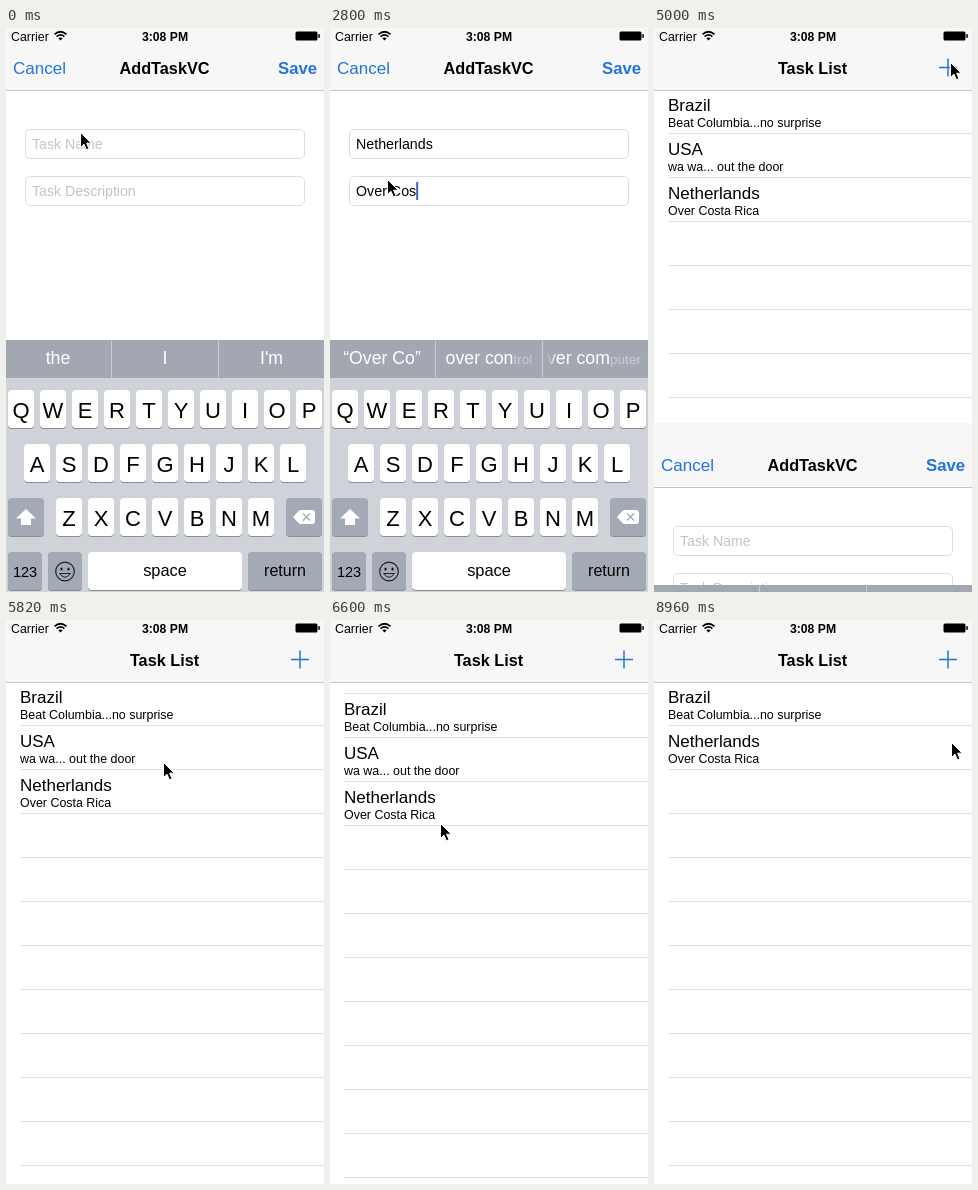
Recreate the animation shown at these times as an HTML page. Size 318x564 px, loop 9000 ms.

```html
<!DOCTYPE html>
<html lang="en">
<head>
<meta charset="utf-8">
<title>Task list</title>
<style>
html, body { margin: 0; width: 100%; height: 100%; overflow: hidden; background: #fff; }
svg { display: block; }
text { font-family: "Liberation Sans", Arial, sans-serif; white-space: pre; }
</style>
</head>
<body>
<svg id="stage" width="318" height="564" viewBox="0 0 318 564"></svg>
<script>
const LOOP = 9000;
const BLUE = '#2175dc', BAR = '#a2a7b2', LINE = '#dfdfe3', GREY = '#a3aab5';
const stage = document.getElementById('stage');

function el(parent, tag, attrs = {}, content) {
  const node = document.createElementNS('http://www.w3.org/2000/svg', tag);
  for (const k in attrs) node.setAttribute(k, attrs[k]);
  if (content !== undefined) node.textContent = content;
  parent.appendChild(node);
  return node;
}
const group = parent => el(parent, 'g');
const rect = (parent, x, y, width, height, fill, more) =>
  el(parent, 'rect', { x, y, width, height, fill, ...more });
const path = (parent, d, more) => el(parent, 'path', { d, fill: 'none', ...more });
const label = (parent, x, y, size, str, more) =>
  el(parent, 'text', { x, y, 'font-size': size, ...more }, str);
const MID = { 'text-anchor': 'middle' };
const BOLD = { 'font-weight': 'bold' };
const move = (node, x, y) => node.setAttribute('transform', `translate(${x} ${y})`);
const show = (node, on) => node.setAttribute('visibility', on ? 'inherit' : 'hidden');

const clamp = u => Math.min(1, Math.max(0, u));
const ease = u => (1 - Math.cos(Math.PI * clamp(u))) / 2;

// Eased value of a step table [[time, a, b...], ...]
function track(steps, t) {
  if (t <= steps[0][0]) return steps[0].slice(1);
  for (let i = 1; i < steps.length; i++) {
    const a = steps[i - 1], b = steps[i];
    if (t <= b[0]) {
      const u = ease((t - a[0]) / (b[0] - a[0]));
      return a.slice(1).map((v, k) => v + (b[k + 1] - v) * u);
    }
  }
  return steps[steps.length - 1].slice(1);
}

// ---- list screen
rect(stage, 0, 0, 318, 564, '#fff');
const table = group(stage);
for (let y = -26.5; y < 564; y += 44) rect(table, 14, y - .5, 304, 1, LINE);

function makeRow(y, title, sub) {
  const g = group(table);
  rect(g, 0, y, 318, 43, '#fff');
  const body = group(g);
  label(body, 14, y + 20.5, 17, title);
  label(body, 14, y + 36.5, 12.45, sub);
  return { g, body };
}
makeRow(62, 'Brazil', 'Beat Columbia...no surprise');
const usa = makeRow(106, 'USA', 'wa wa... out the door');
const trash = group(usa.g);
rect(trash, 318, 106, 318, 43, '#ff3b30');
label(trash, 355, 133, 17, 'Delete', { ...MID, fill: '#fff' });
const last = makeRow(150, 'Netherlands', 'Over Costa Rica');

function navBar(parent, title, top) {
  rect(parent, 0, top, 318, 62 - top, '#f7f7f7');
  rect(parent, 0, 62, 318, 1, '#c6c6d0');
  label(parent, 158.5, 46, 16.25, title, { ...MID, ...BOLD });
}
const listNav = group(stage);
navBar(listNav, 'Task List', 0);
path(listNav, 'M285 39.5H303M294 30.5V48.5', { stroke: BLUE, 'stroke-width': 1.5 });

// ---- form sheet
const sheet = group(stage);
rect(sheet, 0, 0, 318, 564, '#fff');
navBar(sheet, 'AddTaskVC', -2);
label(sheet, 7, 46, 17, 'Cancel', { fill: BLUE });
label(sheet, 272, 46, 16.7, 'Save', { ...BOLD, fill: BLUE });

function makeField(y, hint) {
  rect(sheet, 19.5, y + .5, 279, 29, '#fff', { rx: 4.5, stroke: '#dedee0' });
  return {
    hint: label(sheet, 26, y + 20, 14.15, hint, { fill: '#c4c4c9' }),
    text: label(sheet, 26, y + 20, 14.25, ''),
    caret: rect(sheet, 0, y + 6, 2, 18, '#4561c8')
  };
}
// Each entry: first letter count, then the two guesses shown beside the typed text
const fields = [
  { ...makeField(101, 'Task Name'), word: 'Netherlands', start: 180, step: 90, from: 120, to: 1750,
    guesses: [[1, 'No', 'Not'], [2, 'New', 'Need'], [3, 'Net', 'Network'], [5, 'Nether', 'Neither'],
      [7, 'Nether la', 'Nether lay'], [8, 'Nether land', 'Nether lands'],
      [11, 'Nether landscape', 'Nether landscapes']] },
  { ...makeField(148, 'Task Description'), word: 'Over Costa Rica', start: 1960, step: 110, from: 1750, to: 4820,
    guesses: [[1, 'Of', 'On'], [2, 'Over', 'Overall'], [5, 'the', 'and'], [6, 'over con', 'over com'],
      [7, 'over control', 'over computer'], [8, 'over cost', 'over costs'],
      [9, 'over coast', 'over costs'], [11, 'is', 'and'], [12, 'right', 'really'], [14, 'rich', 'rice']] }
];

// ---- keyboard
const board = group(stage);
rect(board, 0, 312, 318, 252, '#cfd2d9');
rect(board, 0, 312, 318, 38, BAR);

function key(x, y, w, fill = '#fff') {
  rect(board, x, y + 1, w, 38, '#898c92', { rx: 4 });
  rect(board, x, y, w, 38, fill, { rx: 4 });
}
[['QWERTYUIOP', 2, 362], ['ASDFGHJKL', 18, 416], ['ZXCVBNM', 50, 470]].forEach(([chars, x0, y]) =>
  [...chars].forEach((c, i) => {
    key(x0 + i * 32, y, 26);
    label(board, x0 + i * 32 + 13, y + 27.5, 22, c, MID);
  }));
key(2, 470, 36, GREY);
key(280, 470, 36, GREY);
key(2, 524, 34, GREY);
key(42, 524, 34, GREY);
key(82, 524, 154);
key(242, 524, 74, GREY);
path(board, 'M20 481L30 490.5H25V497H15V490.5H10Z', { fill: '#fff' });
path(board, 'M287 489L293 482.5Q294 482 295 482H306Q309 482 309 485V493Q309 496 306 496H295Q294 496 293 495.5Z',
  { fill: '#fff' });
path(board, 'M297 485.5L304 492.5M304 485.5L297 492.5', { stroke: GREY, 'stroke-width': 1.3 });
label(board, 19, 549, 14.5, '123', MID);
label(board, 159, 548, 16.4, 'space', MID);
label(board, 279, 548, 16, 'return', MID);
el(board, 'circle', { cx: 59, cy: 543.5, r: 9.3, fill: 'none', stroke: '#222', 'stroke-width': 1.2 });
[55.5, 62.5].forEach(cx => el(board, 'ellipse', { cx, cy: 541, rx: 1, ry: 1.5 }));
path(board, 'M53.5 545.5Q59 553 64.5 545.5Z', { stroke: '#222', 'stroke-width': 1 });

const fade = el(el(stage, 'defs'), 'linearGradient', { id: 'fade' });
el(fade, 'stop', { offset: .2, 'stop-color': BAR });
el(fade, 'stop', { offset: 1, 'stop-color': BAR, 'stop-opacity': 0 });

// Guess cells: x, width, centre and right edge for long text
const cells = [[0, 105, 52, 98], [106, 106, 53, 93], [213, 105, 52.5, 98]].map(([x, w, mid, end]) => {
  const box = el(board, 'svg', { x, y: 312, width: w, height: 38, overflow: 'hidden' });
  const text = label(box, mid, 24, 17.7, '', { fill: '#fff' });
  return { mid, end, text, veil: rect(box, 0, 0, 14, 38, 'url(#fade)') };
});
[105, 212].forEach(x => rect(board, x, 312, 1, 38, '#c9ccd3'));

// ---- status bar and pointer
const bar = group(stage);
label(bar, 5, 12.5, 12.4, 'Carrier');
label(bar, 159, 12.5, 12.2, '3:08 PM', { ...MID, ...BOLD });
path(bar, 'M48.5 6.3Q54.5 1.2 60.5 6.3M50.6 8.6Q54.5 5.2 58.4 8.6', { stroke: '#000', 'stroke-width': 1.7 });
path(bar, 'M52.3 10.2Q54.5 8.6 56.7 10.2L54.5 12.5Z', { fill: '#000' });
rect(bar, 289.5, 3.5, 22, 9, '#000', { rx: 1.5 });
rect(bar, 312.3, 6, 1.5, 4, '#000', { rx: .7 });

const pointer = path(stage, 'M.5 .5V15.5L4 12.2L6.4 17.8L9 16.7L6.6 11.2H11.2Z',
  { fill: '#000', stroke: '#fff', 'stroke-width': 1 });

// ---- motion tables
const POINTER = [[0, 74, 104], [1440, 74, 104], [1540, 70, 134], [1700, 57, 151], [3700, 57, 151],
  [4500, 285, 44], [4700, 296, 34], [5150, 296, 34], [6150, 112, 177], [6220, 112, 179],
  [6430, 111, 205], [6550, 111, 205], [7100, 85, 127], [7300, 85, 127], [7820, 270, 129],
  [7900, 270, 129], [8120, 190, 129], [8340, 297, 122]];
const PULL = [[6150, 0], [6220, 1], [6430, 16], [6530, 16], [6750, 0]];
const SWIPE = [[7920, 0], [8120, 74], [8420, 74], [8600, 318]];
const SAVE = 4820, DROP = 4840, GUESS_LAG = 130, GROW = 120;
const START_GUESSES = ['the', 'I', "I'm"];

const typed = (f, t) => Math.max(0, Math.min(f.word.length, Math.floor((t - f.start) / f.step) + 1));

function guesses(f, n) {
  const hit = f.guesses.filter(g => g[0] <= n).pop();
  return hit ? [`“${f.word.slice(0, n)}”`, hit[1], hit[2]] : START_GUESSES;
}

function drawGuess(cell, now, before, u) {
  const state = now + before + u;
  if (cell.state === state) return;
  cell.state = state;
  let keep = 0;
  while (keep < now.length && now[keep] === before[keep]) keep++;
  cell.text.textContent = now;
  const long = cell.text.getComputedTextLength() > 98;
  cell.text.setAttribute('x', long ? cell.end : cell.mid);
  cell.text.setAttribute('text-anchor', long ? 'end' : 'middle');
  show(cell.veil, long);
  if (u >= 1) return;
  cell.text.textContent = now.slice(0, keep);
  for (const c of now.slice(keep))
    el(cell.text, 'tspan', { 'font-size': 17.7 * (.6 + .4 * u), 'fill-opacity': u }, c);
}

function draw(t) {
  fields.forEach(f => {
    const n = t < SAVE ? typed(f, t) : 0;
    f.text.textContent = f.word.slice(0, n);
    show(f.hint, !n);
    show(f.caret, t >= f.from && t < f.to);
    f.caret.setAttribute('x', 26 + (n ? f.text.getComputedTextLength() : 0));
  });

  const f = fields[t < fields[1].from ? 0 : 1];
  const lagged = t - GUESS_LAG;
  const n = typed(f, lagged);
  const now = guesses(f, n), before = guesses(f, Math.max(0, n - 1));
  const u = n ? clamp((lagged - f.start - (n - 1) * f.step) / GROW) : 1;
  cells.forEach((c, i) => drawGuess(c, now[i], before[i], i && now[i] !== before[i] ? u : 1));

  move(sheet, 0, Math.round(566 * ease((t - DROP) / 255)));
  move(board, 0, Math.round(252 * ease((t - DROP) / 180)));

  move(table, 0, Math.round(track(PULL, t)[0]));
  const slide = track(SWIPE, t)[0];
  move(usa.body, -slide, 0);
  move(trash, -slide, 0);
  show(usa.g, t < 8620);
  move(last.g, 0, Math.round(-44 * ease((t - 8440) / 180)));

  const [x, y] = track(POINTER, t);
  move(pointer, Math.round(x), Math.round(y));
}

const begin = performance.now();
function tick() {
  draw((performance.now() - begin) % LOOP);
  requestAnimationFrame(tick);
}
tick();
</script>
</body>
</html>
```
